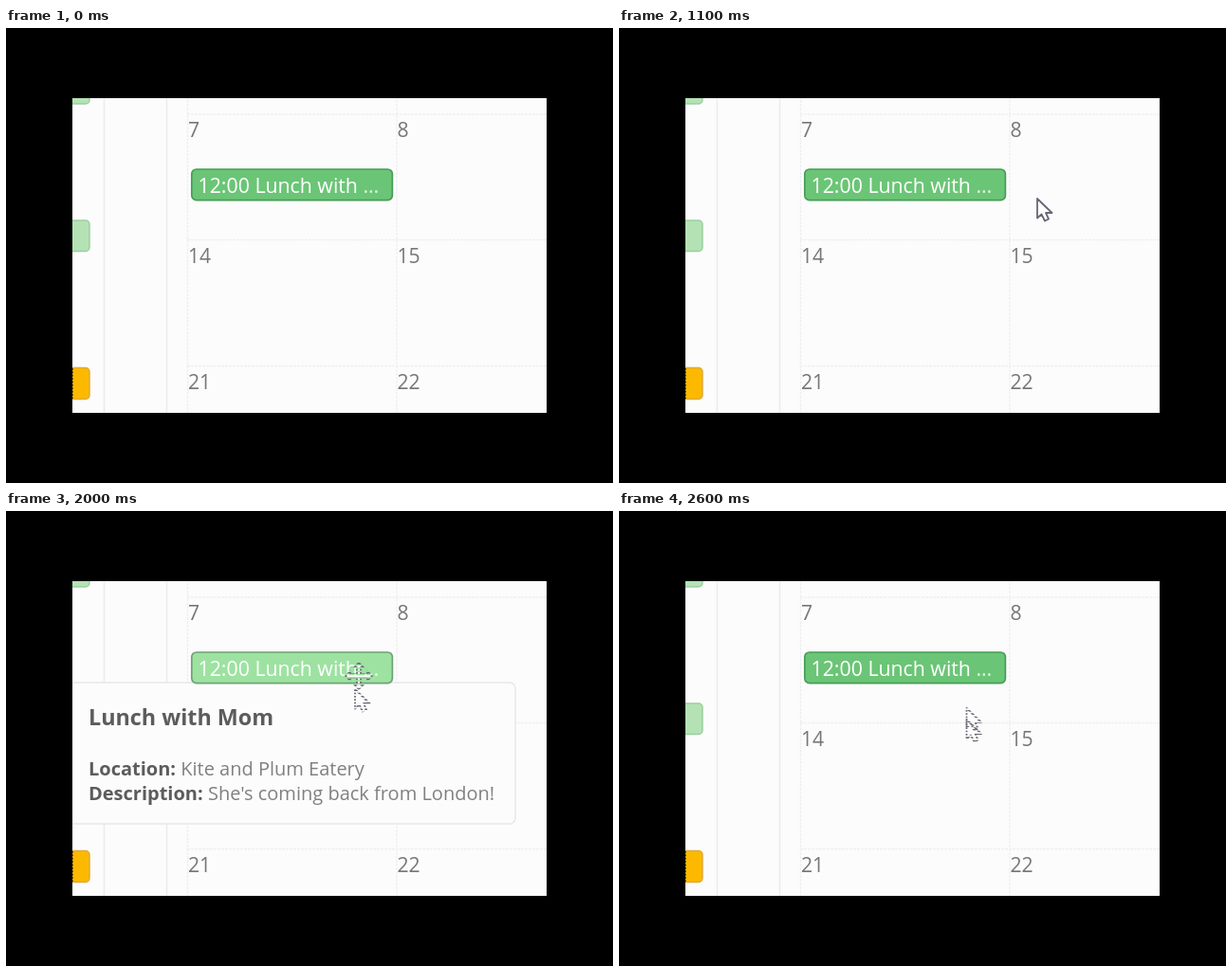
Write an HTML page that moves like this. It is 640 px wide and 480 px high and loops after 2700 ms.

```html
<!DOCTYPE html>
<html lang="en">
<head>
<meta charset="utf-8">
<title>Calendar event tooltip</title>
<style>
  html, body { margin: 0; width: 100%; height: 100%; overflow: hidden; background: #000; }
  svg { display: block; width: 100vw; height: 100vh; font-family: "Open Sans", "Noto Sans", sans-serif; }
  .soft { filter: blur(.5px); }
  .rule { stroke: #ebebeb; stroke-width: 1.5; }
  .grid { stroke: #efefef; stroke-width: 1.5; stroke-dasharray: 3 1; fill: none; }
  .days { font-size: 21.2px; fill: #777; }
  .pale { fill: #b5e2b4; stroke: #99cfa0; stroke-width: 1.5; }
  .amber { fill: #fdb900; stroke: #dfaa38; stroke-width: 1.5; }
  #chip rect { fill: #6bc576; stroke: #479d57; stroke-width: 1.7; }
  #chip.hover rect { fill: #9de2a1; stroke: #6da276; }
  #chip text { font-size: 21.3px; fill: #fff; }
  #popup rect { fill: #fcfcfc; stroke: #e8e8e8; stroke-width: 1.5; }
  #popup text { font-size: 20px; fill: #808080; }
  #popup .bold { font-weight: 700; fill: #5c5c5c; }
  #popup .title { font-size: 23.33px; }
</style>
</head>
<body>
<svg viewBox="0 0 640 480">
  <defs>
    <clipPath id="panel"><rect x="70" y="74" width="500" height="332"/></clipPath>
    <pattern id="lines" width="10" height="3.333" patternUnits="userSpaceOnUse">
      <rect width="10" height="1.667" fill="#fff"/>
    </pattern>
    <pattern id="otherLines" y="1.667" width="10" height="3.333" patternUnits="userSpaceOnUse">
      <rect width="10" height="1.667" fill="#fff"/>
    </pattern>
    <mask id="even" maskUnits="userSpaceOnUse" x="0" y="0" width="640" height="480">
      <rect width="640" height="480" fill="url(#lines)"/>
    </mask>
    <mask id="odd" maskUnits="userSpaceOnUse" x="0" y="0" width="640" height="480">
      <rect width="640" height="480" fill="url(#otherLines)"/>
    </mask>
    <path id="arrow" d="M1 1V21.5L5.5 17.5L9 24.5L13 22.5L10 16H16.5Z"
          fill="#fff" stroke="#686775" stroke-width="1.8" stroke-linejoin="round"/>
    <path id="move" d="M0-14l5 5h-3v7h7v-3l5 5-5 5v-3h-7v7h3l-5 5-5-5h3v-7h-7v3l-5-5 5-5v3h7v-7h-3z"
          fill="#fff" stroke="#66626c" stroke-width="1.7" stroke-linejoin="round"/>
  </defs>

  <g clip-path="url(#panel)">
    <rect x="70" y="74" width="500" height="332" fill="#fcfcfc"/>
    <g class="soft">
      <path class="rule" d="M103.5 60V420M169.5 60V420"/>
      <path class="grid" d="M191.5 60V420M412 60V420M191 91H590M191 223.5H590M191 356.5H590"/>
      <g class="days">
        <text x="192" y="115">7</text><text x="412.5" y="115">8</text>
        <text x="192" y="248">14</text><text x="412.5" y="248">15</text>
        <text x="192" y="381">21</text><text x="412.5" y="381">22</text>
      </g>
      <rect class="pale" x="40" y="48" width="48" height="32" rx="4"/>
      <rect class="pale" x="40" y="203" width="48" height="32.5" rx="4"/>
      <rect class="amber" x="40" y="358.5" width="48" height="33" rx="4"/>
    </g>
    <path d="M70.5 359V391" stroke="#6b4e00" stroke-dasharray="1.7 1.7"/>

    <g id="popup" class="soft">
      <rect x="40" y="181" width="497" height="149" rx="6"/>
      <text class="bold title" x="87" y="226">Lunch with Mom</text>
      <text x="87" y="278.7"><tspan class="bold">Location:</tspan> Kite and Plum Eatery</text>
      <text x="87" y="305.3"><tspan class="bold">Description:</tspan> She's coming back from London!</text>
    </g>
    <g id="chip" class="soft">
      <rect x="195.8" y="149" width="211.6" height="32.6" rx="5"/>
      <text x="202.5" y="173.5">12:00 Lunch with <tspan fill-opacity=".8">…</tspan></text>
    </g>
    <g id="pointer" class="soft"></g>
  </g>
</svg>
<script>
const LOOP = 2700;
const popup = document.getElementById("popup");
const chip = document.getElementById("chip");
const pointer = document.getElementById("pointer");

const cursor = (shape, x, y, rows) =>
  `<g${rows ? ` mask="url(#${rows})"` : ""}><use href="#${shape}" x="${x}" y="${y}"/></g>`;

// Start time, tooltip visible, pointer; interlaced rows blend two pointer positions.
const steps = [
  [0, false, ""],
  [1000, false, cursor("arrow", 537, 190, "even")],
  [1100, false, cursor("arrow", 440, 179)],
  [1200, true, cursor("move", 379, 171)],
  [1300, true, cursor("move", 376, 171)],
  [1400, true, cursor("move", 374, 170)],
  [1500, true, cursor("move", 372, 170)],
  [1800, true, cursor("move", 372, 171)],
  [1900, true, cursor("move", 372, 173)],
  [2000, true, cursor("move", 372, 174, "even") + cursor("arrow", 367, 187, "odd")],
  [2100, false, cursor("arrow", 366, 200)],
  [2200, false, cursor("arrow", 365.5, 206)],
  [2300, false, cursor("arrow", 365.5, 211)],
  [2400, false, cursor("arrow", 365.5, 219)],
  [2600, false, cursor("arrow", 365.5, 207, "even") + cursor("arrow", 365.5, 219, "odd")]
];

let shown;
function draw() {
  const time = performance.now() % LOOP;
  const step = steps.findLast(([start]) => start <= time);
  if (step !== shown) {
    const [, open, markup] = shown = step;
    popup.style.display = open ? "" : "none";
    chip.classList.toggle("hover", open);
    pointer.innerHTML = markup;
  }
  requestAnimationFrame(draw);
}
draw();
</script>
</body>
</html>
```
